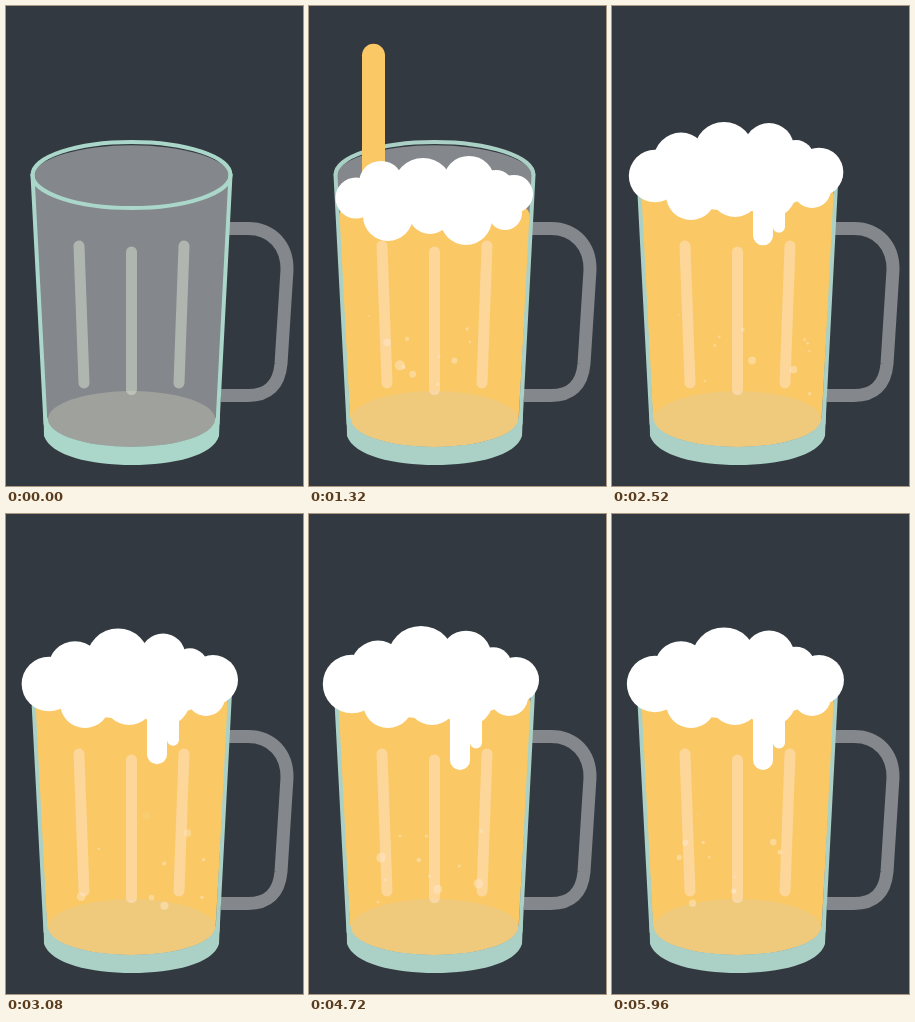
Animation of 297x480 px, one loop 6000 ms. Source, as an HTML page with a canvas:

```html
<!DOCTYPE html>
<html lang="en">
<head>
<meta charset="utf-8">
<title>Filling mug</title>
<style>
html, body { margin: 0; width: 100%; height: 100%; overflow: hidden; background: #323940; }
canvas { display: block; }
</style>
</head>
<body>
<canvas id="stage" width="297" height="480"></canvas>
<script>
const ctx = document.getElementById('stage').getContext('2d');
const LOOP = 6000, FILL = 400, BEER = '#fac864', GLASS = '#84878b';

const handle = new Path2D('M223 222.5H242C266 222.5 281.5 240 281 264L275 358C273 379 262 389.5 242 389.5H215');
const body = new Path2D('M26 169A100 33 0 0 1 225 169L212 425Q205 450 126 450Q46 450 39 425Z');
const inside = new Path2D('M27 169L41 413A84 28 0 0 0 209.5 413L224 169Z');
const sides = new Path2D('M26.5 169L39.5 418M224.5 169L211.5 418');
const base = new Path2D('M37.5 405L38 430C45 450 85 459 126 459C167 459 207 450 213 430L214 405L209 413A83.5 28 0 0 1 42 413Z');

// Foam puffs as [x, y, r]: while pouring, then settled
const puffs = [
  [[47, 192, 20.5], [43, 170, 26]],
  [[72, 177, 22], [69, 154, 27]],
  [[114, 182, 30], [112, 146, 29]],
  [[160, 176, 26], [157, 142, 25]],
  [[187, 182, 18], [184, 152, 18.5]],
  [[205, 188, 19], [207, 166, 24]],
  [[79, 210, 25], [79, 189, 25]],
  [[121, 206, 22], [123, 186, 25]],
  [[157, 213, 26], [158, 186, 26]],
  [[196, 207, 17], [200, 183, 19]]
];

const clamp = v => Math.max(0, Math.min(1, v));
const mix = (a, b, k) => a + (b - a) * k;
const span = (t, start, length) => clamp((t - start) / length);
const easeOut = p => 1 - (1 - p) * (1 - p);
const wave = (t, peak, period) => Math.cos((t - peak) / period * 2 * Math.PI);
const random = n => {
  const v = Math.sin(n * 127.1 + 11.7) * 43758.5453;
  return v - Math.floor(v);
};

function ellipse(x, y, rx, ry = rx, from = 0, to = 2 * Math.PI) {
  ctx.beginPath();
  ctx.ellipse(x, y, rx, ry, 0, from, to);
}

function line(x1, y1, x2, y2, width, color) {
  ctx.lineWidth = width;
  ctx.strokeStyle = color;
  ctx.beginPath();
  ctx.moveTo(x1, y1);
  ctx.lineTo(x2, y2);
  ctx.stroke();
}

function rim(from, to, color) {
  ellipse(125.5, 169, 99, 33, from, to);
  ctx.lineWidth = 4;
  ctx.strokeStyle = color;
  ctx.stroke();
}

function stream(t, level) {
  const head = Math.min(t - 30, level) - 11.5;
  const tail = t < 1267 ? -30 : 0.7 * (t - 1267) + 11.5;
  if (t > 30 && tail < head) line(64.5, tail, 64.5, head, 23, BEER);
}

function beer(level) {
  ctx.save();
  ctx.clip(inside);
  ctx.fillStyle = BEER;
  ellipse(125.5, level, 98 - (level - 169) * 0.06, 31);
  ctx.fill();
  ctx.fillRect(0, level, 297, 480);
  ctx.restore();
}

function bubbles(t) {
  for (let i = 0; i < 11; i++) {
    const age = t / (900 + 500 * random(i)) + random(i + 40);
    const p = age % 1, seed = i * 17 + Math.floor(age) * 5;
    const size = 1.2 + 4 * random(seed + 3) ** 2;
    ellipse(mix(56, 198, random(seed)), 392 - 100 * p, size);
    ctx.fillStyle = `rgba(255,235,210,${0.45 * clamp((1 - p) * 3)})`;
    ctx.fill();
  }
}

function foam(t, level) {
  const settle = easeOut(span(t, 1320, 560));
  const scale = span(t, FILL, 300) * mix(0.8, 1, span(t, FILL, 920));
  const swell = mix(span(t, 1960, 2000), 0.75, span(t, 4720, 1240));
  const sway = [
    4.2 * swell - 1, 0.5 * wave(t, 2200, 2800), 5.5 * swell - 0.5,
    2.5 * wave(t, 1960, 2250), 0.8 * wave(t, 5600, 5000), -wave(t, 4600, 3000)
  ];
  ctx.save();
  if (t < 1320) {
    ctx.translate(125, level);
    ctx.scale(scale, scale);
    ctx.translate(-125, -211);
  }
  ctx.fillStyle = '#fff';
  puffs.forEach(([from, to], i) => {
    const [x, y, r] = from.map((v, j) => mix(v, to[j], settle));
    ellipse(x, y, r + (sway[i] || 0) * settle);
    ctx.fill();
  });
  ellipse(125, mix(194, 177, settle), 80, mix(20, 28, settle));
  ctx.fill();
  ctx.restore();

  const drip = easeOut(span(t, 1420, 2450));
  if (drip) {
    line(151, 185, 151, mix(191, 246, drip), 20, '#fff');
    line(167, 185, 167, mix(203, 228.5, drip), 12, '#fff');
  }
}

function draw(t) {
  const filling = t >= FILL;
  const teal = filling ? '#abd1c7' : '#abd7ca';
  const level = 425 - 234 * easeOut(span(t, FILL, 1300));
  ctx.fillStyle = '#323940';
  ctx.fillRect(0, 0, 297, 480);

  ctx.lineCap = 'butt';
  ctx.lineWidth = 13;
  ctx.strokeStyle = GLASS;
  ctx.stroke(handle);
  ctx.fillStyle = GLASS;
  ctx.fill(body);
  rim(Math.PI, 2 * Math.PI, teal);

  ctx.lineCap = 'round';
  stream(t, level);
  if (filling) beer(level);
  ellipse(125.5, 413, 83.5, 28);
  ctx.fillStyle = filling ? 'rgba(215,205,180,.3)' : 'rgba(200,200,180,.4)';
  ctx.fill();
  if (t > 900) bubbles(t);

  ctx.fillStyle = teal;
  ctx.fill(base);
  ctx.lineWidth = 4;
  ctx.strokeStyle = teal;
  ctx.stroke(sides);
  if (t < 1320) rim(0, Math.PI, teal);

  const shine = filling ? 'rgba(255,232,215,.46)' : 'rgba(215,225,210,.52)';
  line(73, 240, 78, 377, 11, shine);
  line(125.5, 246, 125.5, 383.5, 11, shine);
  line(178, 240, 173, 377, 11, shine);
  if (filling) foam(t, level);
}

const start = performance.now();
function tick() {
  draw((performance.now() - start) % LOOP);
  requestAnimationFrame(tick);
}
tick();
</script>
</body>
</html>
```
